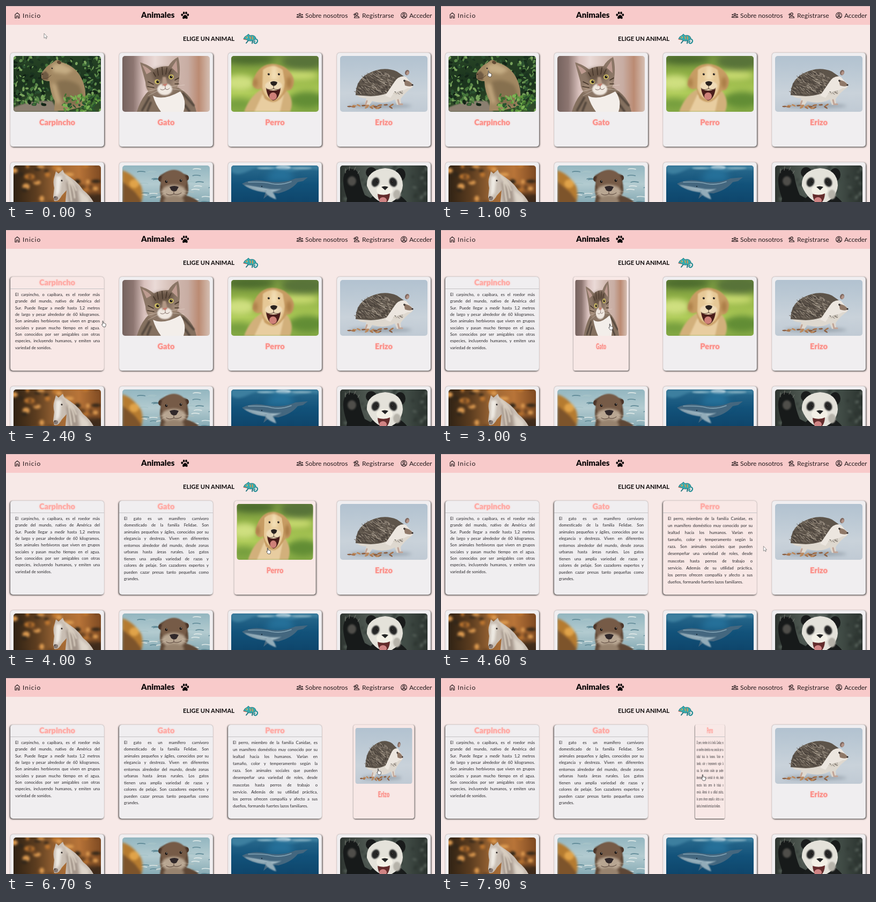
Recreate the animation shown at these times as an HTML page. Size 800 px wide and 365 px high, loop 8000 ms.

```html
<!DOCTYPE html>
<html lang="es">
<head>
<meta charset="utf-8">
<title>Animales</title>
<style>
html, body { margin: 0; width: 100%; height: 100%; overflow: hidden; }
body { position: relative; background: #f7e9e7; font-family: Lato, "Open Sans", sans-serif; }
#page, #cursor { position: absolute; left: 0; top: 0; }
.card { position: absolute; width: 175px; height: 175px; border-radius: 5px; background: #f0eef0;
  box-shadow: 1px 1px 3px rgba(0,0,0,.8), inset 0 0 1px #999; }
.card.turning { background: #f8e8e6; }
.face { position: absolute; inset: 0; }
.face svg { position: absolute; left: 6px; top: 6px; border-radius: 5px; }
.back { transform: scaleX(-1); }
.name { position: absolute; width: 100%; text-align: center; font-weight: 900; font-size: 14.6px; line-height: 22px;
  color: #fb918b; text-shadow: 0 0 3px #fcc0bb; }
.front .name { top: 119px; }
.back .name { top: 0; color: #ffaaa5; border-bottom: 1px solid #c4c2c5; }
.story { position: absolute; left: 9px; top: 27px; width: 158px; font-size: 7.6px; color: #29272b; }
.story div { text-align: justify; text-align-last: justify; }
.story div:last-child { text-align-last: left; }
</style>
</head>
<body>
<svg id="page" width="800" height="365">
  <rect width="800" height="35" fill="#f8caca"/>
  <rect width="800" height="1" fill="#cbb0b3"/>
  <g fill="none" stroke="#2b2022" stroke-width="1.2">
    <path d="M17 22.500V16L21 12.800L25 16V22.500H22.500V18.500H19.500V22.500Z"/>
    <circle cx="548" cy="15.500" r="1.700"/><path d="M544 21.500Q544 18.700 548 18.700T552 21.500Z"/>
    <circle cx="654" cy="15" r="2.200"/><path d="M649.500 22Q649.500 18.800 654 18.800T658.500 22ZM650 13.500V18.500M647.500 16H652.500"/>
    <circle cx="742" cy="17.500" r="5.400"/><circle cx="742" cy="16" r="1.900"/><path d="M738 21.300Q742 17.700 746 21.300"/>
  </g>
  <g fill="#2b2022">
    <circle cx="543.700" cy="16.300" r="1.300"/><circle cx="552.300" cy="16.300" r="1.300"/>
    <path d="M541.500 21.500Q541.500 19 544 19L543.200 21.500ZM554.500 21.500Q554.500 19 552 19L552.800 21.500Z"/>
  </g>
  <g fill="#0c0809">
    <ellipse cx="328.300" cy="16.500" rx="1.900" ry="2.300"/><ellipse cx="331.700" cy="13" rx="1.800" ry="2.400"/>
    <ellipse cx="336" cy="13" rx="1.800" ry="2.400"/><ellipse cx="339.300" cy="16.500" rx="1.900" ry="2.300"/>
    <path d="M334 16.500C336.500 16.500 339.500 20.500 338.500 23C337.500 25 335.500 23 334 23S330.500 25 329.300 23C328.500 20.500 331.500 16.500 334 16.500Z"/>
  </g>
  <g font-size="12" fill="#20181a">
    <text x="31" y="21.500" letter-spacing="1">Inicio</text>
    <text x="558" y="21.500">Sobre nosotros</text>
    <text x="664" y="21.500" letter-spacing=".15">Registrarse</text>
    <text x="752" y="21.500" letter-spacing="-.1">Acceder</text>
    <text x="252" y="22" font-size="15" font-weight="900" fill="#0c0809">Animales</text>
    <text x="330" y="65" font-size="11.200" font-weight="700" fill="#0c0809">ELIGE UN ANIMAL</text>
  </g>
  <g stroke-linecap="round" fill="none">
    <path d="M464 61Q470 62 469 66Q467 71 463 69Q461 66 464.500 65.500" stroke="#268f96" stroke-width="2.200"/>
    <path d="M452 64L448 69M460 65L459 69.500" stroke="#1d727d" stroke-width="2"/>
    <path d="M443 61Q445 56 449 55L452 52L455 55Q463 53 466 59Q466 64 459 65Q452 66 449 63Z" fill="#35aaad" stroke="#1d6871" stroke-width=".7"/>
    <circle cx="449" cy="58.500" r="1.700" fill="#f5d787"/><circle cx="448.700" cy="58.500" r=".8" fill="#222"/>
    <path d="M455 57L456 61M459.500 57L460 62" stroke="#ef9448" stroke-width="1.600"/>
    <path d="M443 62L448 63" stroke="#d45b45"/>
  </g>
</svg>
<svg id="cursor" width="14" height="16">
  <path id="arrow" d="M1 1V10L3.200 8.200L4.600 11.200L6 10.500L4.700 7.700H7.200Z" fill="#fff" stroke="#666" stroke-width=".7"/>
  <path id="hand" d="M2.300 1Q3.500 .5 3.600 2V5Q5 4.400 5.400 5.400Q6.500 5 7 6Q8.500 5.800 8.500 7.500Q8.500 10 7.500 12H3.500L.7 8Q.7 6.800 2.300 7.600Z" fill="#fff" stroke="#222" stroke-width=".7"/>
</svg>
<script>
let seed = 7;
const rand = (a, b) => a + (b - a) * ((seed = seed * 16807 % 2147483647) / 2147483647);
const pick = list => list[Math.floor(rand(0, list.length))];
const many = (n, draw) => Array.from({length: n}, draw).join('');
const path = (d, fill) => `<path d="${d}" fill="${fill}"/>`;
const line = (d, color, w = 1) => `<path d="${d}" fill="none" stroke="${color}" stroke-width="${w}" stroke-linecap="round"/>`;
const oval = (x, y, rx, ry, fill, turn = 0) =>
  `<ellipse cx="${x}" cy="${y}" rx="${rx}" ry="${ry}" fill="${fill}" transform="rotate(${turn} ${x} ${y})"/>`;
const soft = (body, r = 4) => `<g style="filter:blur(${r}px)">${body}</g>`;
let shades = 0;
function backdrop(across, ...colors) {
  const id = 'shade' + shades++;
  const stops = colors.map((c, i) => `<stop offset="${i / (colors.length - 1)}" stop-color="${c}"/>`).join('');
  return `<linearGradient id="${id}" x2="${across ? 1 : 0}" y2="${across ? 0 : 1}">${stops}</linearGradient>
    <rect width="163" height="104" fill="url(#${id})"/>`;
}
const leaves = (n, x0, x1, y0, y1, colors) => many(n, () =>
  oval(rand(x0, x1), rand(y0, y1), rand(2, 5), rand(1, 3), pick(colors), rand(0, 180)));
const eye = (x, y, r = 2) => oval(x, y, r, r, '#17110f') + oval(x + r * .3, y - r * .4, r * .3, r * .3, '#fff');

function capybara() {
  const greens = ['#122416', '#2b5030', '#44743a', '#5c8a4a', '#1a3320', '#79a35c'];
  return backdrop(false, '#264325', '#1b331d', '#34502b') + leaves(300, 0, 163, 0, 92, greens)
    + soft(path('M0 104V96Q30 82 72 84L84 104Z', '#8b7f70'), 1)
    + soft(path('M52 33Q60 19 72 13L79 8Q85 6 90 12Q116 19 127 42Q139 66 131 94L98 102H76L77 84Q68 68 67 47Q56 47 52 41Z', '#a28862'), .5)
    + soft(path('M80 48Q100 40 122 54Q133 70 125 92L100 95Q86 80 80 48Z', '#86704f')
      + path('M72 16L90 14L112 26L98 34L74 30Z', '#c5ad84') + path('M70 50L80 54L88 88H80Z', '#c0a67d'), 3)
    + soft(path('M52 33L60 28L66 35L64 45L54 44Z', '#6f5a43'), 1) + oval(85, 12, 4, 3, '#634b34', 25)
    + eye(72, 23, 1.3) + oval(54, 34, 1.5, 1, '#3a2a1e') + line('M54 42Q62 44 70 36', '#604933')
    + leaves(85, 92, 163, 72, 104, ['#3f7030', '#5d963d', '#2a5530', '#7db354']) + leaves(60, 0, 60, 60, 92, greens);
}
function cat() {
  return backdrop(true, '#75625e', '#8d7671', '#d9c1bd', '#eadad7', '#dcc8c1', '#cfb6ad', '#c8ada3', '#bb8b73', '#d5bfb3')
    + soft(path('M27 104Q36 74 55 60L104 59Q132 74 138 104Z', '#84705f'), .7)
    + soft(line('M50 78L37 101M113 70L133 92M109 81L125 103M53 87L47 102', '#54473d', 4), 1)
    + soft(path('M57 74Q76 84 108 66Q121 83 114 104H72Q62 91 57 74Z', '#f3eeea'), .7)
    + path('M43 49L33 12Q48 16 59 25Q72 18 86 19Q92 8 104 2Q109 20 106 42Q105 62 89 72Q72 81 55 72Q43 64 43 49Z', '#8b7666')
    + soft(path('M54 28Q74 18 96 26L90 40L78 44L60 46Z', '#685546') + oval(54, 60, 7, 8, '#a58d7a') + oval(98, 53, 6, 9, '#a58d7a'), 3)
    + path('M45 34L37 17Q48 22 54 29ZM92 22L101 8L103 32Z', '#bd9b90')
    + soft(line('M65 23L67 36M74 21L75 35M83 22L81 34M48 48L58 53M47 57L59 59M98 45L105 41M98 52L105 52M58 31L62 38M91 25L87 33', '#443529', 1.6), .5)
    + soft(oval(79, 62, 14, 11, '#f0e8e0') + path('M75 39L81 39L84 54L74 56Z', '#b39885'), 1)
    + oval(65, 48, 5, 4.5, '#cdbb62', 15) + eye(66, 48, 2.6) + oval(91, 39, 5, 4.5, '#cdbb62', -20) + eye(91, 39, 2.6)
    + path('M75 53L84 51L80 57Z', '#c77e70') + line('M80 57V61Q75 65 71 62M80 61Q84 65 88 60', '#66514a', .8)
    + line('M70 60L43 67M70 63L48 74M88 57L116 54M88 61L115 64', '#f4ece4', .4);
}
function dog() {
  return backdrop(false, '#71903f', '#8fb044', '#aecb58', '#86aa45')
    + soft(oval(35, 6, 45, 10, '#4c6b2d') + oval(134, 10, 40, 16, '#587339') + oval(125, 36, 38, 8, '#cbdc72')
      + oval(16, 50, 28, 14, '#cfdf80') + oval(142, 82, 35, 16, '#628d35') + oval(14, 90, 25, 10, '#769e3e'), 6)
    + soft(path('M24 104Q34 76 55 63L104 65Q118 83 110 104Z', '#d2b07b')
      + path('M43 104L58 72H98L91 104Z', '#e8cda0'), 1.5)
    + soft(path('M57 21Q75 9 98 20Q114 30 117 46Q115 66 104 64L97 73Q82 95 62 79L56 60Q47 66 40 54Q42 32 57 21Z', '#c79c63')
      + path('M59 26Q76 12 96 26L100 49Q97 79 79 82Q63 79 58 59Z', '#e6c896'), .8)
    + soft(path('M77 19L83 20L87 44L73 44Z', '#f3dfb6') + oval(45, 50, 4, 9, '#a97b45') + oval(108, 50, 5, 11, '#a97b45'), 3)
    + eye(70, 34, 2) + eye(89, 34, 2) + soft(oval(79, 56, 16, 10, '#efdbb8'), 1)
    + path('M65 61Q78 68 92 61Q89 81 78 83Q68 79 65 61Z', '#4a1d1b') + oval(78, 75, 7, 7, '#cf8078')
    + path('M73 49Q79 45 86 49Q85 55 79 56Q73 54 73 49Z', '#29211e') + line('M79 56V61M79 61Q70 65 65 60M79 61Q87 65 92 60', '#5b4438', 1);
}
function hedgehog() {
  const spines = many(420, () => {
    const a = rand(Math.PI, 2 * Math.PI), r = Math.sqrt(rand(0, 1)), x = 75 + 43 * r * Math.cos(a), y = 72 + 42 * r * Math.sin(a);
    return line(`M${x} ${y}l${-rand(2, 6)} ${-rand(1, 4)}`, pick(['#35302d', '#8a7e71', '#cbbfae', '#4f463f']), .7);
  });
  return backdrop(false, '#b2c2d0', '#bdcad5', '#c9d2da', '#c0cad4') + soft(oval(75, 93, 58, 4, '#98a3ad'), 3)
    + path('M29 70Q52 63 82 65L100 48L120 39Q129 47 136 53Q137 59 130 62Q119 71 113 80L114 91H106L102 81Q82 91 60 84L54 93H45L49 79Q34 79 29 70Z', '#ded8cf')
    + path('M29 73Q29 45 52 33Q80 18 106 29L119 38Q107 49 102 60Q87 74 57 75Z', '#5d544a') + spines
    + soft(path('M101 49Q110 35 123 39Q130 48 136 53Q135 61 126 60Q114 67 102 66L94 78L84 74Z', '#ece6df'), .6)
    + soft(path('M119 45Q129 45 136 54Q132 59 121 55Z', '#8f7868'), .6)
    + oval(125, 31, 4, 5, '#806961', 20) + oval(126, 32, 2.5, 3.5, '#b39387', 20) + eye(120, 46, 1.8) + oval(135, 54, 1.6, 1.6, '#262021')
    + line('M50 84L47 92H53M108 82L110 90H116', '#c2a496', 3)
    + many(18, () => oval(rand(17, 117), rand(91, 98), 4, 1.4, pick(['#a77249', '#bc8759', '#8a5f43']), rand(-35, 35)));
}
function horse() {
  return backdrop(true, '#2f2214', '#5b3c1f', '#9c6634', '#b87438', '#7e4a22')
    + soft(many(45, () => oval(rand(0, 163), rand(0, 75), rand(3, 10), rand(2, 6), pick(['#33271a', '#bd7630', '#6d4522', '#dc9a50']))), 2)
    + soft(oval(145, 66, 26, 14, '#3d2a1b'))
    + soft(path('M76 22L79 11L84 15L92 8L95 16Q118 27 130 46Q146 58 154 78V104H93L99 46L90 56Q84 68 76 66L74 58L76 42Q73 30 76 22Z', '#c9beb3'), .5)
    + soft(path('M98 30L118 40L124 84H105Z', '#a3958a') + path('M79 20L90 20L86 51L78 60Z', '#eeeae3') + path('M122 46L140 60L140 80L128 80Z', '#ded5ca'), 2)
    + soft(line('M92 14Q109 25 117 46M98 22Q112 35 114 60M103 32L108 66', '#d8cdbf', 3), .8)
    + eye(90, 28, 1.5) + soft(oval(79, 61, 4, 4, '#867a75', 15), .6) + oval(77, 59, 1, 1.6, '#403834');
}
function otter() {
  return backdrop(false, '#93b6c0', '#b3cbd0', '#86aab4', '#7b9ea8')
    + soft(many(60, () => { const x = rand(25, 163), y = rand(0, 90); return line(`M${x} ${y}q5 -2 14 0`, pick(['#dde7e6', '#5f8996', '#a6c3c8']), 1.6); }), .6)
    + soft(path('M0 9Q20 15 35 38Q42 60 30 82L0 95Z', '#b57b30') + path('M0 30L24 50L36 66L30 82H0Z', '#7d542b')
      + oval(22, 34, 9, 8, '#e0a349'), 2)
    + soft(path('M64 104L72 57Q68 43 72 32Q65 20 73 17Q92 5 113 16Q125 15 121 29Q126 50 119 56Q146 62 155 87V104Z', '#5e4736'), .8)
    + oval(71, 25, 4, 5, '#4b3529') + oval(120, 23, 4, 5, '#4b3529') + soft(oval(96, 30, 24, 22, '#765b47'), 1)
    + soft(oval(96, 49, 23, 13, '#b8a692') + oval(96, 66, 19, 10, '#97836f'), 2)
    + eye(82, 30, 2.4) + eye(109, 28, 2.4) + path('M88 40Q97 36 105 40L101 47Q96 50 91 46Z', '#30282a')
    + line('M96 48V53Q88 57 82 53M96 53Q103 56 110 51', '#58443a') + line('M80 47L61 52M80 51L64 61M112 47L133 50M112 51L130 59', '#d6c7b4', .4);
}
function whale() {
  return backdrop(false, '#2b6b8e', '#12527a', '#0e456b', '#0b3f64')
    + soft(path('M0 0H163V8Q142 5 120 10T76 7T32 10T0 11Z', '#3d7f9f'), 2)
    + soft(oval(97, 4, 14, 4, '#e3eef0') + oval(66, 5, 18, 2, '#8cb7c8') + oval(130, 5, 20, 2, '#7faabd'), 1.5)
    + soft(path('M80 5L62 30H118L108 5Z', '#26719a'), 7)
    + soft(path('M20 34Q38 24 64 29Q90 34 112 27L120 24L143 22L134 29L124 31Q112 46 88 52L74 51L60 62L64 50Q36 47 20 34Z', '#44677f'), .6)
    + soft(path('M24 36Q48 40 66 43Q84 46 94 43Q78 53 58 49Q36 45 24 36Z', '#a3bac5') + path('M62 46Q66 58 84 63Q80 50 72 44Z', '#93acb9'), 1)
    + line('M30 39Q49 43 66 47M36 42Q51 46 65 49', '#5c7c8f', .5) + oval(57, 39, 1, 1, '#0a1b28')
    + soft(line('M32 31Q61 30 76 34Q94 37 112 30', '#83a3b4', 1.6), .7);
}
function panda() {
  return backdrop(true, '#2e3531', '#48514b', '#59635d', '#414c46', '#2a322e')
    + soft(leaves(50, 0, 163, 0, 70, ['#35403a', '#5d6861', '#2d3531']), 2)
    + soft(path('M8 16Q14 2 22 7Q31 5 36 20Q39 39 46 55L59 62V104H7L13 61Q2 31 8 16Z', '#171a1a'), .6)
    + soft(oval(22, 29, 8, 9, '#4f4e4a'), 1.5) + line('M10 14V6M17 9L18 2M26 9L29 3M33 15L36 10', '#777871', 1)
    + soft(path('M39 104Q49 52 79 50Q128 46 140 104Z', '#191c1c')
      + oval(58, 13, 10, 10, '#191b1b') + oval(112, 17, 10, 12, '#191b1b')
      + path('M50 38Q48 9 84 5Q116 7 117 37Q115 60 92 70Q64 72 50 38Z', '#e4e2da'), .6)
    + soft(oval(66, 31, 7, 9, '#252626', 25) + oval(99, 31, 7, 9, '#252626', -25) + oval(106, 54, 7, 9, '#b6b3aa'), 1) + eye(69, 30, 1.5) + eye(97, 30, 1.5)
    + oval(83, 46, 15, 10, '#f3f0e6') + path('M77 40Q83 37 90 40L84 46Z', '#242526')
    + path('M70 53Q83 57 93 52Q92 70 80 72Q71 68 70 53Z', '#632c2c') + oval(80, 65, 7, 6, '#d08484');
}

const tales = [
  ['Carpincho', 12.35, 'El carpincho, o capibara, es el roedor más|grande del mundo, nativo de América del|Sur. Puede llegar a medir hasta 1,2 metros|de largo y pesar alrededor de 60 kilogramos.|Son animales herbívoros que viven en grupos|sociales y pasan mucho tiempo en el agua.|Son conocidos por ser amigables con otras|especies, incluyendo humanos, y emiten una|variedad de sonidos.'],
  ['Gato', 12.45, 'El gato es un mamífero carnívoro|domesticado de la familia Felidae. Son|animales pequeños y ágiles, conocidos por su|elegancia y destreza. Viven en diferentes|entornos alrededor del mundo, desde zonas|urbanas hasta áreas rurales. Los gatos|tienen una amplia variedad de razas y|colores de pelaje. Son cazadores expertos y|pueden cazar presas tanto pequeñas como|grandes.'],
  ['Perro', 13.1, 'El perro, miembro de la familia Canidae, es|un mamífero doméstico muy conocido por su|lealtad hacia los humanos. Varían en|tamaño, color y temperamento según la|raza. Son animales sociales que pueden|desempeñar una variedad de roles, desde|mascotas hasta perros de trabajo o|servicio. Además de su utilidad práctica,|los perros ofrecen compañía y afecto a sus|dueños, formando fuertes lazos familiares.'],
  ['Erizo', 12.4, 'El erizo es un pequeño mamífero cubierto|de púas. Son animales nocturnos que comen|insectos y frutas. Cuando se asustan,|se enrollan formando una bola|para protegerse.']
];
const cursor = document.getElementById('cursor');
const cards = [capybara, cat, dog, hedgehog, horse, otter, whale, panda].map((draw, i) => {
  const [name, lead, text] = tales[i] || ['', 12, ''];
  const card = document.createElement('div');
  card.className = 'card';
  card.style.left = 8 + i % 4 * 203 + 'px';
  card.style.top = (i < 4 ? 87 : 291) + 'px';
  card.innerHTML = `<div class="face front"><svg width="163" height="104">${draw()}</svg><div class="name">${name}</div></div>
    <div class="face back"><div class="name">${name}</div><div class="story" style="line-height:${lead}px">
    ${text.split('|').map(s => `<div>${s}</div>`).join('')}</div></div>`;
  document.body.insertBefore(card, cursor);
  return card;
});

const LOOP = 8000, TURN = 800;
// card, start time, direction
const flips = [[0, 1705, 1], [1, 2840, 1], [2, 3890, 1], [3, 5080, 1], [3, 6355, -1], [2, 7705, -1]];
// time, x, y
const trail = [[0, 71, 51], [400, 71, 51], [1450, 97, 166], [2150, 97, 166], [2750, 313, 175], [3150, 313, 175],
  [3750, 486, 175], [4250, 486, 175], [4900, 692, 169], [6850, 692, 169], [7500, 486, 180], [8000, 486, 180]];

// cubic-bezier(.25, .1, .25, 1)
function ease(x) {
  if (x <= 0) return 0;
  if (x >= 1) return 1;
  let lo = 0, hi = 1, u;
  for (let i = 0; i < 20; i++) {
    u = (lo + hi) / 2;
    if (.75 * u * (1 - u) + u ** 3 < x) lo = u; else hi = u;
  }
  return .3 * u * (1 - u) ** 2 + 3 * u * u * (1 - u) + u ** 3;
}
function pointer(t) {
  const i = trail.findIndex(p => p[0] > t), [t0, x0, y0] = trail[i - 1], [t1, x1, y1] = trail[i];
  const k = (t - t0) / (t1 - t0), s = k * k * (3 - 2 * k);
  return [x0 + (x1 - x0) * s, y0 + (y1 - y0) * s];
}
function show(now) {
  const t = now % LOOP;
  cards.forEach((card, i) => {
    let turn = 0, busy = false;
    for (const [which, start, dir] of flips) if (which === i) {
      turn += dir * ease((t - start) / TURN);
      busy = busy || t > start && t < start + TURN;
    }
    const [front, back] = card.children;
    card.style.transform = `scaleX(${Math.cos(turn * Math.PI)})`;
    card.classList.toggle('turning', busy);
    front.style.display = turn < .5 ? '' : 'none';
    back.style.display = turn < .5 ? 'none' : '';
  });
  const [x, y] = pointer(t), over = y > 87 && x > 8 && (x - 8) % 203 < 175;
  cursor.style.transform = `translate(${x - 1}px, ${y - 1}px)`;
  document.getElementById('hand').style.display = over ? '' : 'none';
  document.getElementById('arrow').style.display = over ? 'none' : '';
}
const began = performance.now();
function tick() {
  show(performance.now() - began);
  requestAnimationFrame(tick);
}
tick();
</script>
</body>
</html>
```
